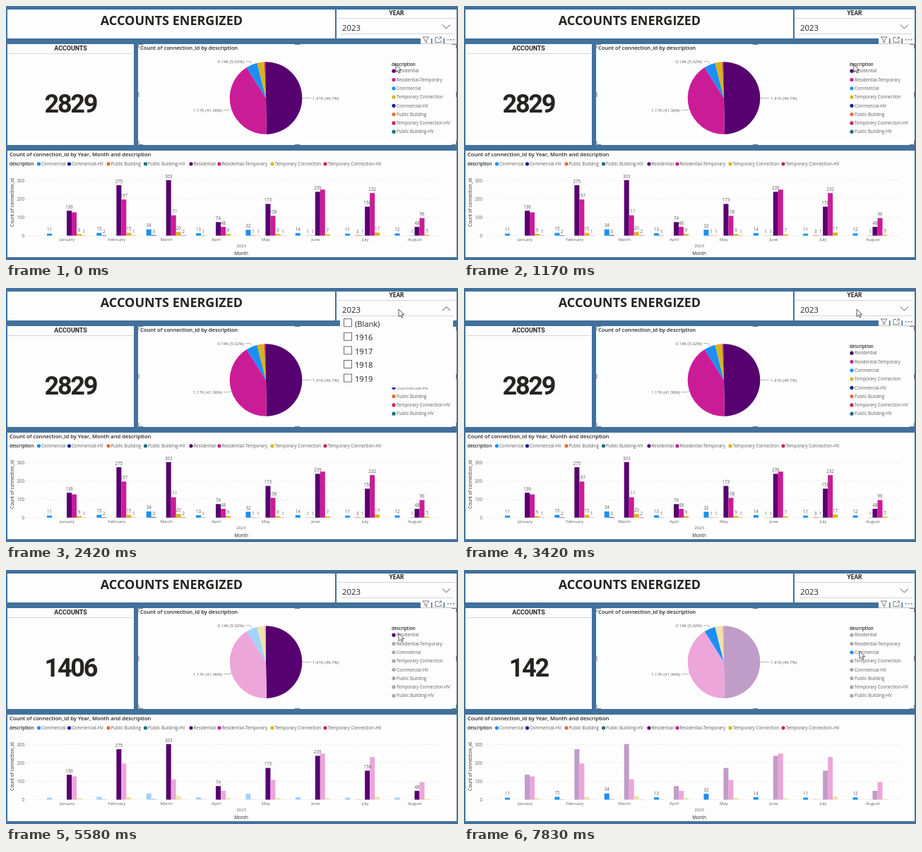
An HTML page that plays this animation: 640x360 px, repeating every 8 s.

```html
<!DOCTYPE html>
<html lang="en">
<head>
<meta charset="utf-8">
<title>Accounts energized</title>
<style>
  html, body { margin: 0; width: 100%; height: 100%; overflow: hidden; background: #41719c; }
  svg { display: block; width: 640px; height: 360px; font-family: "Open Sans", "Noto Sans", sans-serif; }
  .narrow { font-family: Roboto, sans-serif; }
</style>
</head>
<body>
<svg viewBox="0 0 640 360">
  <g id="board"></g>
  <path id="cursor" d="M0 0V10.6L2.5 8.3L4.3 12L6 11.2L4.3 7.6H7.6Z" fill="#fdfdfd" stroke="#303030" stroke-width=".8"/>
</svg>
<script>
const LOOP = 8000;
const PAPER = '#fdfdfd', INK = '#252423', SOFT = '#605e5c', RULE = '#d4d4d4', GREY = '#aaa8aa';

// Stacked in the order of the bar slots within one month
const series = [
  { name: 'Commercial', color: '#1b8ff6', dim: '#a3d2fb', x: 46.5, counts: [11, 15, 34, 13, 32, 14, 11, 12] },
  { name: 'Commercial-HV', color: '#12239e', dim: '#a0a7d8', x: 89.5, counts: [0, 2, 3, 1, 1, 0, 0, 0] },
  { name: 'Public Building', color: '#e66c37', dim: '#f5c4af', x: 145, counts: [0, 0, 0, 0, 1, 1, 3, 0] },
  { name: 'Public Building-HV', color: '#197278', dim: '#a3c7c9', x: 197.5, counts: [0, 0, 0, 0, 0, 1, 1, 1] },
  { name: 'Residential', color: '#570070', dim: '#c09cc8', x: 262, counts: [136, 275, 303, 74, 173, 239, 158, 48] },
  { name: 'Residential-Temporary', color: '#cb1c98', dim: '#eca6da', x: 302, counts: [127, 197, 111, 48, 108, 251, 232, 96] },
  { name: 'Temporary Connection', color: '#d9b31c', dim: '#f0e3a8', x: 377, counts: [9, 15, 20, 9, 9, 7, 17, 5] },
  { name: 'Temporary Connection-HV', color: '#c8285c', dim: '#efb5b9', x: 452, counts: [1, 1, 2, 0, 1, 0, 0, 0] },
];
const months = ['January', 'February', 'March', 'April', 'May', 'June', 'July', 'August'];
const legendOrder = [4, 5, 0, 6, 1, 2, 7, 3];
const slices = [[4, 49.7], [5, 41.36], [0, 5.02], [6, 3.2], [7, 0.72]];

const rect = (x, y, w, h, fill, extra = '') =>
  `<rect x="${x}" y="${y}" width="${w}" height="${h}" fill="${fill}" ${extra}/>`;
const line = (d, color = RULE, extra = '') => `<path d="${d}" fill="none" stroke="${color}" ${extra}/>`;
const dot = (x, y, color) => `<circle cx="${x}" cy="${y}" r="2.6" fill="${color}"/>`;
const text = (x, y, value, size = 6.2, { color = SOFT, anchor = 'start', weight = 400, extra = '' } = {}) =>
  `<text x="${x}" y="${y}" font-size="${size}" fill="${color}" text-anchor="${anchor}" font-weight="${weight}" ${extra}>${value}</text>`;
const middle = { anchor: 'middle' };
const heading = { color: INK, anchor: 'middle', weight: 700 };
const narrow = { ...heading, extra: 'class="narrow"' };
const chartTitle = { color: INK, weight: 600 };

function header() {
  return rect(2, 5, 464, 41, PAPER) +
    text(234.5, 26.5, 'ACCOUNTS ENERGIZED', 18, heading) +
    rect(468, 5, 170, 41, PAPER) +
    text(553, 13.2, 'YEAR', 8.4, narrow) +
    line('M470 17.5H636');
}

function card(total) {
  return rect(2, 54, 179, 143, PAPER) +
    text(91.5, 63.2, 'ACCOUNTS', 8.9, narrow) +
    line('M3 67.5H180') +
    text(91.3, 151, total, 36, { ...heading, extra: 'class="narrow" letter-spacing="-2.3"' });
}

function pie(selected) {
  const cx = 368, cy = 130.5, r = 51.3;
  const at = share => {
    const a = share / 100 * 2 * Math.PI;
    return `${cx + r * Math.sin(a)} ${cy - r * Math.cos(a)}`;
  };
  let sum = 0, out = '';
  for (const [i, share] of slices) {
    const s = series[i];
    const fill = selected === null || selected === i ? s.color : s.dim;
    out += `<path d="M${cx} ${cy}L${at(sum)}A${r} ${r} 0 0 1 ${at(sum + share)}Z" fill="${fill}"/>`;
    sum += share;
  }
  const leader = d => line(d, '#a6a6a6', 'stroke-width=".8"');
  return out + leader('M420 130.5H432') + leader('M308 147.5H316L320 146') + leader('M339 78.5H346L348 82') +
    text(434, 132.6, '1.41K (49.7%)', 6) +
    text(306, 149.6, '1.17K (41.36%)', 6, { anchor: 'end' }) +
    text(337, 80.6, '0.14K (5.02%)', 6, { anchor: 'end' });
}

function piePanel(selected) {
  const legend = legendOrder.map((i, row) => {
    const y = 92.2 + row * 12.28;
    const color = selected !== null && selected !== i ? GREY : series[i].color;
    return dot(549, y, color) + text(553, y + 2.2, series[i].name);
  }).join('');
  const handles = 'M188 60V54.5H194 M631 54.5H637.5V60 M188 191V196.5H194 M631 196.5H637.5V191' +
    'M188 122V129 M637.5 122V129 M409 196.5H416 M409 54.5H416';
  return rect(187, 54, 451, 143, PAPER) +
    line(handles, '#808080') +
    text(190, 62.3, 'Count of connection_id by description', 7.6, chartTitle) +
    pie(selected) +
    text(546, 84.6, 'description', 6.2, chartTitle) + legend;
}

function toolbar() {
  const ink = '#6c6c6c';
  return rect(587, 42, 15, 11.5, PAPER) + rect(603.5, 42, 16, 11.5, PAPER) + rect(621, 42, 17, 11.5, PAPER) +
    line('M587 53.5H638', '#c8c8c8') +
    line('M590 44H599L595.6 48V52L593.4 50.5V48Z', ink, 'stroke-width=".9"') +
    line('M612 44.5H608V51.5H616V48.5M612.5 47.5L616 44.2M613.5 44H616.3V46.8', ink, 'stroke-width=".9"') +
    [625, 629, 633].map(x => rect(x, 47, 1.6, 1.6, ink)).join('');
}

function yearBox(open) {
  let out = '';
  if (open) {
    out = rect(473, 40, 160, 101, PAPER) +
      ['(Blank)', 1916, 1917, 1918, 1919].map((label, i) => {
        const y = 43.7 + i * 19.6;
        return rect(478.5, y, 11, 11, PAPER, 'stroke="#706e6c"') +
          text(494, y + 10.9, label, 11.1, { color: INK });
      }).join('');
  }
  return out + line('M474 39.5H634') + text(476, 35, 2023, 11.4, { color: INK }) +
    line(open ? 'M618 32L623.5 26.5L629 32' : 'M618 26.5L623.5 32L629 26.5', '#505050');
}

function barPanel(selected) {
  const base = 325.5, unit = 0.26, width = 7;
  let out = rect(2, 205, 636, 151, PAPER) +
    text(5, 212.6, 'Count of connection_id by Year, Month and description', 7.6, chartTitle) +
    text(5, 226, 'description', 6.3, chartTitle);
  for (const s of series) out += dot(s.x, 223.8, s.color) + text(s.x + 3.4, 226, s.name);
  for (let v = 0; v <= 300; v += 100) {
    const y = base - v * unit;
    out += line(`M29 ${y}H617`, RULE, 'stroke-width=".7" stroke-dasharray="1 3"') +
      text(26, y + 2, v, 6.2, { anchor: 'end' });
  }
  let labels = '';
  months.forEach((month, m) => {
    const left = 58 + m * 70.36;
    out += text(left + 28.5, 332.8, month, 6, middle);
    series.forEach((s, i) => {
      const count = s.counts[m];
      if (!count) return;
      const x = left + i * width, top = base - count * unit;
      const lit = selected === null || selected === i;
      out += rect(x, top, width, count * unit, lit ? s.color : s.dim);
      // Labels that would collide with the neighbouring one are left off
      const crowded = selected === null && i === 5 && (m === 0 || m === 5);
      if (lit && !crowded) labels += text(x + width / 2, top - 3.2, count, 6.2, middle);
    });
  });
  return out + labels + text(333, 341.5, 2023, 6, middle) +
    text(333, 352.6, 'Month', 6.4, { color: INK, anchor: 'middle' }) +
    text(0, 0, 'Count of connection_id', 6.4,
      { color: INK, anchor: 'middle', extra: 'transform="translate(11.3 278.5) rotate(-90)"' });
}

const clicks = [[4420, 4], [6170, 5], [7750, 0]];
const selectionAt = t => clicks.reduce((found, [time, i]) => t >= time ? i : found, null);

// Each move: start, end, target x, target y
const moves = [[1340, 1580, 556, 30], [3840, 4170, 556, 90], [6000, 6000, 556, 103], [7090, 7500, 560, 115]];
function cursorAt(t) {
  let x = 552, y = 83;
  for (const [start, end, toX, toY] of moves) {
    if (t < start) break;
    const k = t >= end ? 1 : (t - start) / (end - start);
    x += (toX - x) * k;
    y += (toY - y) * k;
  }
  return [x, y];
}

const board = document.getElementById('board');
const cursor = document.getElementById('cursor');
let shown = '';

function frame() {
  const t = performance.now() % LOOP;
  const selected = selectionAt(t);
  const open = t >= 1920 && t < 3170;
  const state = `${selected} ${open}`;
  if (state !== shown) {
    shown = state;
    const total = selected === null ? 2829 : series[selected].counts.reduce((a, b) => a + b);
    board.innerHTML = header() + card(total) + piePanel(selected) + barPanel(selected) +
      (open ? '' : toolbar()) + yearBox(open);
  }
  cursor.setAttribute('transform', `translate(${cursorAt(t)})`);
  requestAnimationFrame(frame);
}
frame();
</script>
</body>
</html>
```
